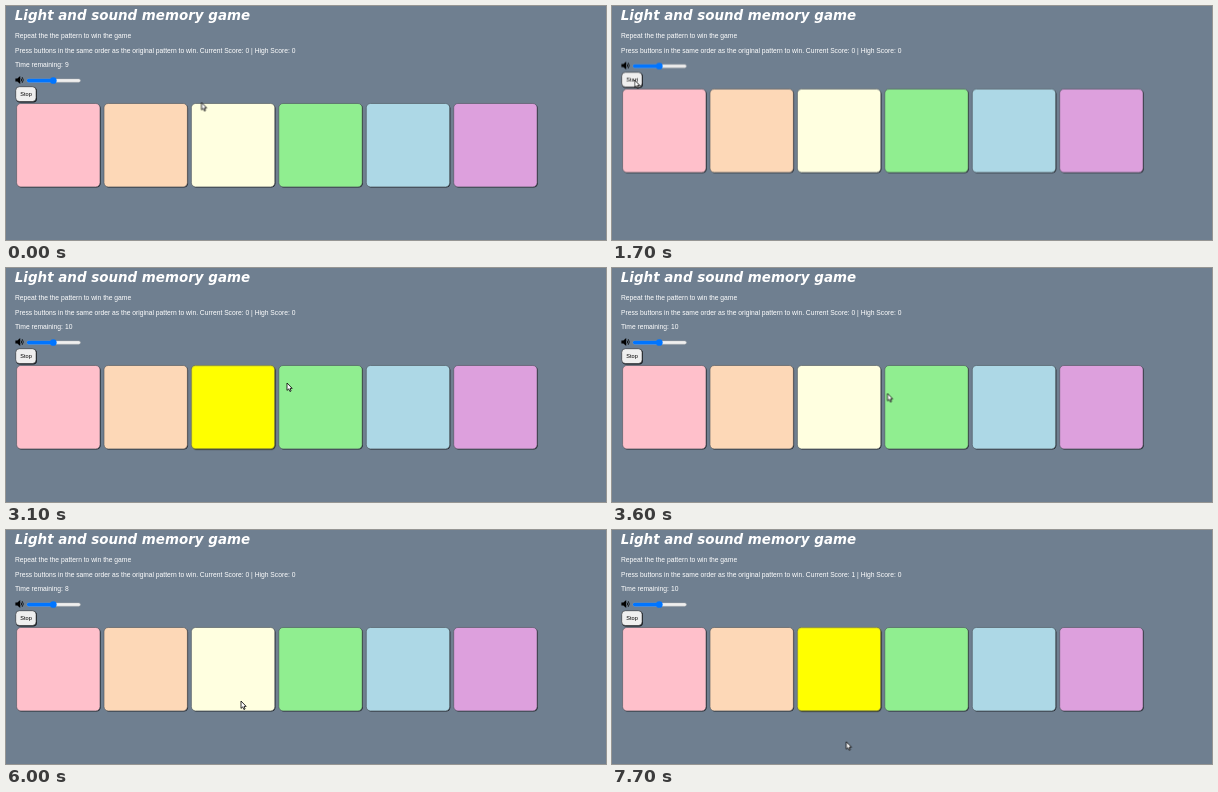
Write an HTML page that moves like this. It is 600 px wide and 234 px high and loops after 8 s.

```html
<!DOCTYPE html>
<html lang="en">
<head>
<meta charset="utf-8">
<title>Light and sound memory game</title>
<style>
  html, body { margin: 0; width: 100%; height: 100%; overflow: hidden; background: #6f7f90; }
  svg { display: block; width: 100vw; height: 100vh; }
  text { font: 6.72px Arial, "Liberation Sans", sans-serif; fill: #fff; white-space: pre; }
  .title { font: italic bold 13.44px "DejaVu Sans", Verdana, sans-serif; }
  .label { font-size: 5.6px; fill: #000; text-anchor: middle; }

  /* 8 s loop: 1.25% is 100 ms */
  .anim { animation: 8s step-end infinite; }
  .panel  { animation-name: panel; }
  .run    { animation-name: run; }
  .idle   { animation-name: idle; opacity: 0; }
  .lit    { animation-name: lit; opacity: 0; }
  .score0 { animation-name: score0; }
  .score1 { animation-name: score1; opacity: 0; }
  .t10    { animation-name: t10; opacity: 0; }
  .t9     { animation-name: t9; }
  .t8     { animation-name: t8; opacity: 0; }
  .t7     { animation-name: t7; opacity: 0; }
  .cursor { animation-name: cursor; }

  @keyframes panel {
    0%, 22.5%, 100% { transform: none; }
    16.25% { transform: translateY(-14.45px); }
  }
  @keyframes run  { 0%, 22.5%, 100% { opacity: 1; } 16.25% { opacity: 0; } }
  @keyframes idle { 0%, 22.5%, 100% { opacity: 0; } 16.25% { opacity: 1; } }
  @keyframes lit {
    0%, 45%, 81.25% { opacity: 0; }
    35%, 78.75%, 93.75%, 100% { opacity: 1; }
  }
  @keyframes score0 { 0% { opacity: 1; } 81.25%, 100% { opacity: 0; } }
  @keyframes score1 { 0% { opacity: 0; } 81.25%, 100% { opacity: 1; } }
  @keyframes t10 { 0%, 60% { opacity: 0; } 22.5%, 81.25%, 100% { opacity: 1; } }
  @keyframes t9  { 0%, 60% { opacity: 1; } 1.25%, 72.5%, 100% { opacity: 0; } }
  @keyframes t8  { 0%, 13.75%, 81.25%, 100% { opacity: 0; } 1.25%, 72.5% { opacity: 1; } }
  @keyframes t7  { 0%, 16.25%, 100% { opacity: 0; } 13.75% { opacity: 1; } }

  @keyframes cursor {
    0%     { transform: translate(195.5px, 96.5px); }
    7.5%   { transform: translate(195.5px, 96.5px); animation-timing-function: steps(7, start); }
    16.25% { transform: translate(22px, 86px); }
    17.5%  { transform: translate(22px, 86px); animation-timing-function: steps(3, start); }
    21.25% { transform: translate(22.5px, 74px); }
    28.75% { transform: translate(22.5px, 74px); animation-timing-function: steps(5, start); }
    35%    { transform: translate(291px, 106px); }
    38.75% { transform: translate(281px, 115px); }
    41.25% { transform: translate(272px, 135px); }
    42.5%  { transform: translate(275.5px, 125.5px); }
    46.25% { transform: translate(275.5px, 125.5px); animation-timing-function: steps(4, start); }
    51.25% { transform: translate(240px, 221px); animation-timing-function: steps(4, start); }
    56.25% { transform: translate(234px, 173px); }
    57.5%  { transform: translate(235px, 173px); }
    66.25% { transform: translate(235px, 171px); }
    91.25% { transform: translate(235px, 201px); }
    93.75% { transform: translate(235px, 201px); animation-timing-function: steps(3, start); }
    97.5%, 100% { transform: translate(234.3px, 211.7px); }
  }
</style>
</head>
<body>
<svg viewBox="0 0 600 234">
  <defs>
    <g id="tile">
      <rect x="1" y="1" width="83.4" height="83.4" rx="4.2" fill="#23272d"/>
      <rect x=".3" y=".3" width="83.4" height="83.4" rx="4.2" stroke="#4a525c" stroke-width=".6"/>
    </g>
  </defs>

  <text class="title" x="8.8" y="14.1">Light and sound memory game</text>
  <text x="9" y="32.3">Repeat the the pattern to win the game</text>
  <text x="9" y="46.8">Press buttons in the same order as the original pattern to win. Current Score:</text>
  <text class="anim score0" x="239.45" y="46.8">0</text>
  <text class="anim score1" x="239.45" y="46.8">1</text>
  <text x="245.05" y="46.8">| High Score: 0</text>

  <g class="anim run">
    <text x="9" y="61.2">Time remaining:</text>
    <text class="anim t10" x="59.05" y="61.2">10</text>
    <text class="anim t9" x="59.05" y="61.2">9</text>
    <text class="anim t8" x="59.05" y="61.2">8</text>
    <text class="anim t7" x="59.05" y="61.2">7</text>
  </g>

  <g class="anim panel">
    <!-- volume -->
    <path d="M9.4 72.4h2l2.8-2.4v8l-2.8-2.4h-2z"/>
    <path d="M15.1 72.5q1.2 1.5 0 3M16.2 71.2q2.2 2.8 0 5.6" fill="none" stroke="#000" stroke-width=".8"/>
    <rect x="21" y="72.9" width="53.4" height="3.3" rx="1.6" fill="#efefef" stroke="#b2b2b2" stroke-width=".4"/>
    <rect x="20.8" y="72.7" width="27" height="3.7" rx="1.8" fill="#0075ff"/>
    <circle cx="47.3" cy="74.5" r="3.35" fill="#0075ff"/>

    <!-- start / stop -->
    <rect x="10.2" y="81.2" width="20.7" height="15.3" rx="3.8" fill="#15181c"/>
    <rect x="9.7" y="80.7" width="20.4" height="14.9" rx="3.8" fill="#efefef" stroke="#22262b" stroke-width=".6"/>
    <text class="label anim run" x="20" y="90">Stop</text>
    <text class="label anim idle" x="20.2" y="90">Start</text>

    <!-- tiles -->
    <use href="#tile" x="10.3" y="97.2" fill="#ffc0cb"/>
    <use href="#tile" x="97.7" y="97.2" fill="#fdd8b7"/>
    <use href="#tile" x="185.1" y="97.2" fill="#ffffe0"/>
    <use class="anim lit" href="#tile" x="185.1" y="97.2" fill="#ff0"/>
    <use href="#tile" x="272.5" y="97.2" fill="#90ee90"/>
    <use href="#tile" x="360" y="97.2" fill="#add8e6"/>
    <use href="#tile" x="447.4" y="97.2" fill="#dda0dd"/>
  </g>

  <path class="anim cursor" d="M0 0V7.4L1.7 5.9 2.9 8.5 4.1 8 3 5.4H5.2Z"
        fill="#fff" stroke="#000" stroke-width=".8" stroke-linejoin="round"/>
</svg>
</body>
</html>
```
